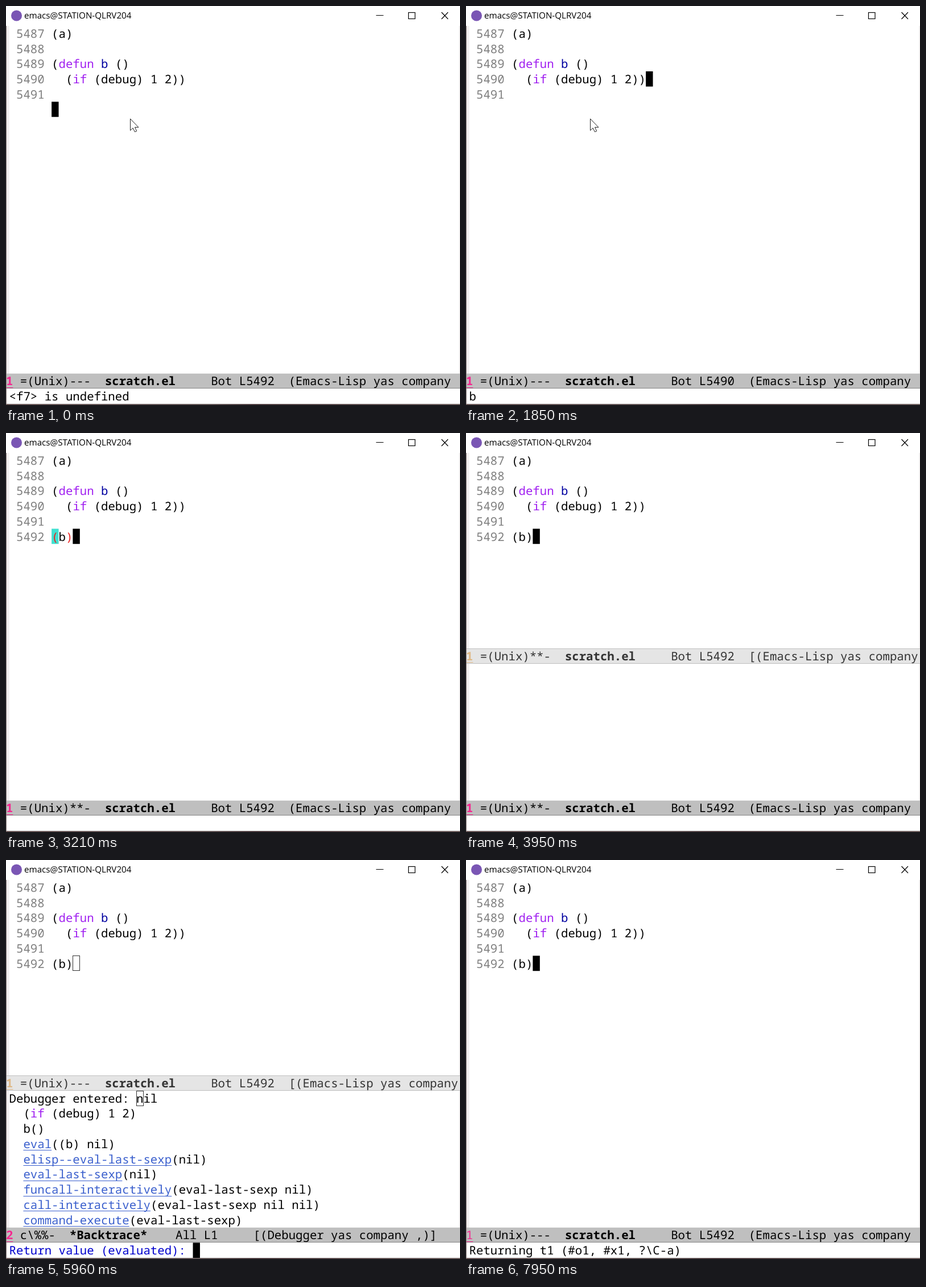
Recreate the animation shown at these times as an HTML page. Size 798x702 px, loop 8000 ms.

```html
<!DOCTYPE html>
<html lang="en">
<head>
<meta charset="utf-8">
<title>Debugger session</title>
<style>
  html, body { margin: 0; width: 100%; height: 100%; overflow: hidden; background: #fff; }
  svg { display: block; width: 798px; height: 702px; }
  text { white-space: pre; text-rendering: geometricPrecision; font: 20.7px "Noto Sans Mono", monospace; }
  .title { font: 15.2px "Open Sans", sans-serif; }
  .bold { font-weight: 700; }
</style>
</head>
<body>
<svg id="stage" viewBox="0 0 798 702" xmlns="http://www.w3.org/2000/svg">
  <defs>
    <linearGradient id="desktop">
      <stop offset="0" stop-color="#6d5253"/>
      <stop offset=".45" stop-color="#5b4a4c"/>
      <stop offset=".55" stop-color="#3b2228"/>
      <stop offset="1" stop-color="#75605f"/>
    </linearGradient>
  </defs>
  <rect width="798" height="702" fill="#fff"/>
  <circle cx="18.5" cy="17" r="9.5" fill="#7a56b4"/>
  <text class="title" x="32" y="22">emacs@STATION-QLRV204</text>
  <g fill="none" stroke="#000" stroke-width="1.2">
    <path d="M650.5 16.5h13M765.5 11l11.5 12M777 11l-11.5 12"/>
    <rect x="707.5" y="11.5" width="11.5" height="11"/>
  </g>
  <path d="M1 35h4.6v612H1zM796 35h2v612h-2z" fill="#f2f0f0"/>
  <g id="editor"></g>
  <path d="M0 35h1v665H0z" fill="#857878"/>
  <rect y="700" width="798" height="1" fill="#77706f"/>
  <rect y="701" width="798" height="1" fill="url(#desktop)"/>
</svg>
<script>
const CELL = 12.42, ROW = 26.75, LEFT = 5.6, TOP = 34.7, BASE = 21.1;
const SPLIT = 378.8, TRACE = SPLIT + ROW, MODE = SPLIT + 10 * ROW, ECHO = MODE + ROW;
const LOOP = 8000;
const editor = document.getElementById('editor');

const PURPLE = '#a020f0', NUMBER = '#7f7f7f', LINK = '#3a5fcd', PINK = '#f5278f';

const escapeText = s => s.replace(/&/g, '&amp;').replace(/</g, '&lt;');

// Each run is [text, color, style]; runs follow each other on the cell grid.
function line(x, top, runs) {
  let col = 0, out = '';
  for (const [str, color = '#000', style = ''] of runs) {
    const runX = x + col * CELL;
    out += `<text x="${runX}" y="${top + BASE}" fill="${color}" class="${style}">${escapeText(str)}</text>`;
    if (style.includes('link')) {
      out += `<path d="M${runX} ${Math.floor(top + 25) + .5}h${str.length * CELL}" stroke="${color}"/>`;
    }
    col += str.length;
  }
  return out;
}

function cursor(x, top, filled, char = '') {
  return filled
    ? `<rect x="${x}" y="${top}" width="${CELL}" height="${ROW}"/>` + line(x, top, [[char, '#fff']])
    : `<rect x="${Math.floor(x) + .5}" y="${Math.round(top) + .5}" width="12" height="26" fill="none" stroke="#333"/>`;
}

function modeLine(top, active, [num, flags, name, rest], thin) {
  const ink = active ? '#000' : '#333', edge = Math.round(top);
  const bar = active
    ? `<rect y="${edge + .7}" width="798" height="26" fill="#bfbfbf"/><path d="M0 ${edge + 27 - .5}h798" stroke="#858585"/>`
    : `<rect x="-1" y="${edge + .5}" width="800" height="26" fill="#e5e5e5" stroke="#bfbfbf"/>`;
  return bar + line(0, top, [
    [num, active ? PINK : '#deb887', thin ? 'link' : 'bold link'],
    [flags, ink], [name, ink, 'bold'], [rest, ink]
  ]);
}

const codeLines = [
  [['(a)']],
  [],
  [['('], ['defun', PURPLE], [' '], ['b', '#0000a0'], [' ()']],
  [['  ('], ['if', PURPLE], [' (debug) 1 2))']],
  []
];

const traceLines = [
  [['Debugger entered: nil']],
  [['  ('], ['if', PURPLE], [' (debug) 1 2)']],
  [['  b()']],
  ...[
    ['eval', '((b) nil)'],
    ['elisp--eval-last-sexp', '(nil)'],
    ['eval-last-sexp', '(nil)'],
    ['funcall-interactively', '(eval-last-sexp nil)'],
    ['call-interactively', '(eval-last-sexp nil nil)'],
    ['command-execute', '(eval-last-sexp)']
  ].map(([fn, args]) => [['  '], [fn, LINK, 'link'], [args]])
];

const start = {
  row: 5, col: 0, typed: '', match: false, pointer: true, flags: '---',
  split: false, trace: false, focus: 'code', prompt: '', echo: '<f7> is undefined', thin: false
};

const steps = [
  [640, { row: 4, echo: '' }],
  [900, { row: 3 }],
  [1180, { col: 19 }],
  [1570, { echo: 'b' }],
  [2060, { row: 4, col: 0, echo: '' }],
  [2270, { row: 5 }],
  [2680, { typed: '(', col: 1, pointer: false, flags: '**-' }],
  [2890, { typed: '(b', col: 2 }],
  [3030, { typed: '(b)', col: 3, match: true }],
  [3550, { match: false }],
  [3900, { split: true }],
  [4020, { trace: true, focus: 'trace' }],
  [5060, { flags: '---' }],
  [5200, { focus: 'echo', prompt: 'Return value (evaluated): ' }],
  [6850, { echo: 't' }],
  [7670, { split: false, trace: false, focus: 'code', prompt: '', echo: 'Returning t', thin: true }],
  [7740, { echo: 'Returning t1 (#o1, #x1, ?\\C-a)' }]
];

function codeWindow(s) {
  const lastTop = TOP + 5 * ROW, textX = LEFT + 6 * CELL;
  let out = codeLines.map((runs, i) =>
    line(LEFT, TOP + i * ROW, [[` ${5487 + i} `, NUMBER], ...runs])).join('');
  if (s.typed) {
    out += line(LEFT, lastTop, [[' 5492 ', NUMBER]]);
    if (s.match) out += `<rect x="${textX}" y="${lastTop}" width="${CELL}" height="${ROW}" fill="#40e0d0"/>`;
    out += line(textX, lastTop, [...s.typed].map(c => [c, s.match && c !== 'b' ? '#ee2020' : '#000']));
  }
  out += cursor(textX + s.col * CELL, TOP + s.row * ROW, s.focus === 'code');
  if (s.pointer) {
    out += '<path d="M218.5 198.5V219l4.7-4.3 3.2 6.8 3.3-1.5-3.2-6.6h6.4z" fill="#fff" stroke="#222"/>';
  }
  return out;
}

function traceWindow(s) {
  const out = traceLines.map((runs, i) => line(LEFT, TRACE + i * ROW, runs)).join('');
  return out + cursor(LEFT + 18 * CELL, TRACE, s.focus === 'trace', 'n');
}

function draw(s) {
  const position = `     Bot L${5487 + s.row}  `;
  const status = lead => ['1', ` =(Unix)${s.flags}  `, 'scratch.el', `${position}${lead}(Emacs-Lisp yas company`];
  const backtrace = ['2', ' c\\%%-  ', '*Backtrace*', '    All L1     [(Debugger yas company ,)]'];
  let out = codeWindow(s);
  if (s.split) out += modeLine(SPLIT, false, status('['));
  if (s.trace) out += traceWindow(s);
  out += modeLine(MODE, true, s.trace ? backtrace : status(''), s.thin);
  out += line(LEFT, ECHO, [[s.prompt, '#0000cd'], [s.echo]]);
  if (s.focus === 'echo') out += cursor(LEFT + (s.prompt + s.echo).length * CELL, ECHO + .3, true);
  editor.innerHTML = out;
}

let shown = -1;
function render(time) {
  const done = steps.filter(([at]) => at <= time);
  if (done.length === shown) return;
  shown = done.length;
  draw(Object.assign({}, start, ...done.map(([, change]) => change)));
}

const began = performance.now();
function tick() {
  render((performance.now() - began) % LOOP);
  requestAnimationFrame(tick);
}
tick();
</script>
</body>
</html>
```
